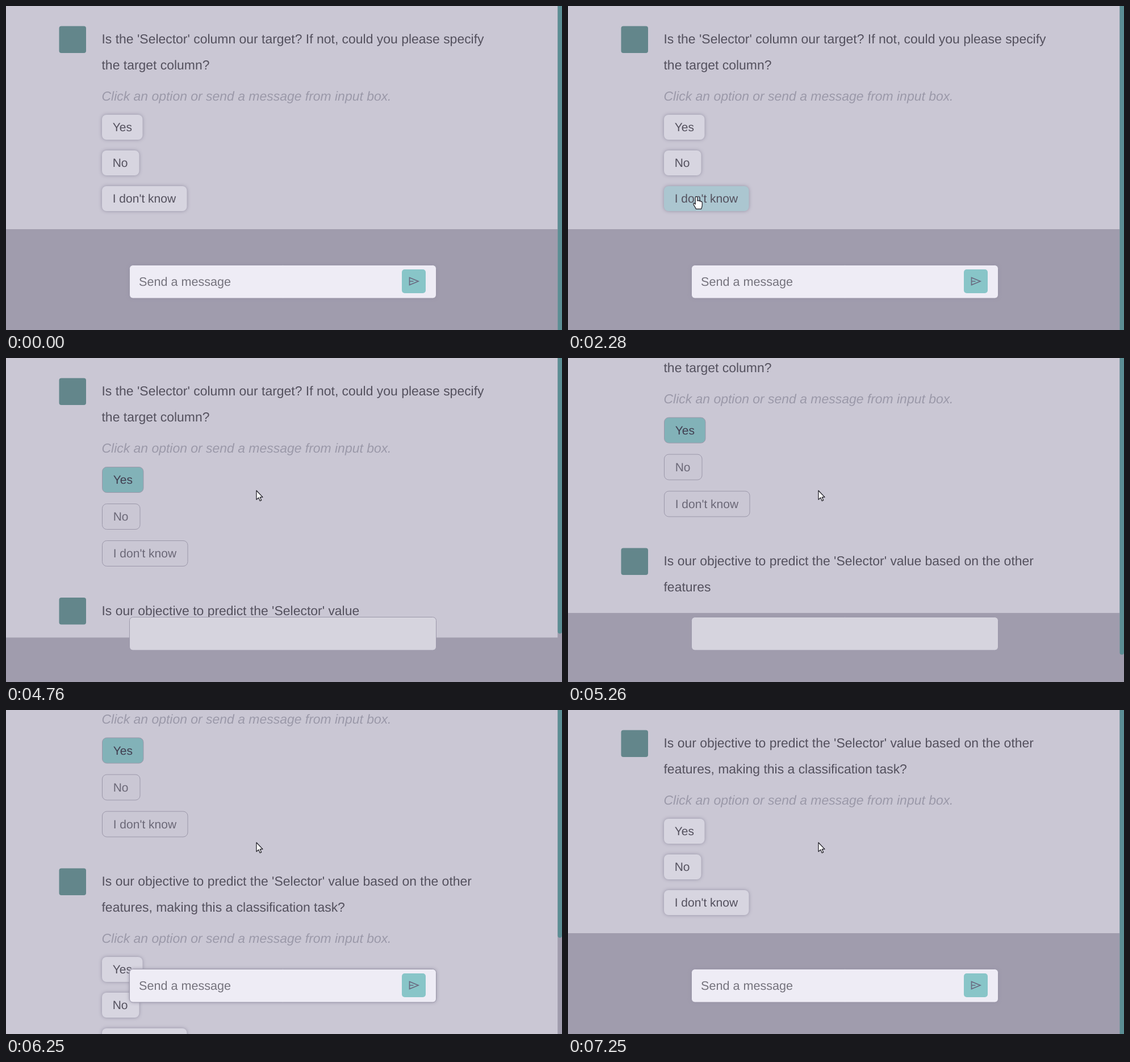
These frames come from a looping animation (979x572 px, 8 s). An HTML page with a canvas:

```html
<!DOCTYPE html>
<html lang="en">
<head>
<meta charset="utf-8">
<title>Chat options</title>
<style>
html, body { margin: 0; width: 100%; height: 100%; overflow: hidden; background: #a09cad; }
canvas { display: block; width: 979px; height: 572px; }
</style>
</head>
<body>
<canvas id="stage"></canvas>
<script>
const W = 979, H = 572, LOOP = 8000;
const PICK = 3680, ASK = 6090, GAP = 387.5;
const BAR = 971.5, BODY = 22.95;
const FONT = '"Liberation Sans", Arial, sans-serif';
const canvas = document.getElementById('stage');
const ctx = canvas.getContext('2d');
const dpr = window.devicePixelRatio || 1;
canvas.width = W * dpr;
canvas.height = H * dpr;

const HINT = 'Click an option or send a message from input box.';
const OPTIONS = [['Yes', 71.5], ['No', 65.5], ["I don't know", 149.5]];
const FIRST = ["Is the 'Selector' column our target? If not, could you please specify",
  'the target column?'];
// streamed reply: [time, token, line]
const TOKENS = [
  [3760, 'Is', 0], [3840, ' our', 0], [4020, ' objective', 0], [4100, ' to', 0],
  [4180, ' predict', 0], [4260, ' the', 0], [4350, " '", 0], [4430, 'Selector', 0],
  [4510, "'", 0], [4600, ' value', 0], [4840, ' based', 0], [4930, ' on', 0],
  [5010, ' the', 0], [5090, ' other', 0], [5180, 'features', 1], [5340, ',', 1],
  [5430, ' making', 1], [5510, ' this', 1], [5680, ' a', 1],
  [5760, ' classification', 1], [5840, ' task', 1], [6010, '?', 1]
];
// pointer path: [time, x, y]
const PATH = [
  [70, 905, 351], [150, 735, 325], [230, 540, 287], [310, 465, 270], [390, 386, 260],
  [480, 330, 247], [560, 270, 238], [640, 228, 232], [810, 215, 222], [890, 221, 222],
  [1350, 221, 222], [1600, 222, 272], [1990, 222, 272], [2210, 226, 336],
  [2900, 226, 336], [3200, 211, 222], [3960, 211, 222], [4500, 441, 234]
];

const clamp = v => Math.max(0, Math.min(1, v));
const ramp = (t, a, b) => clamp((t - a) / (b - a));
const ease = p => (1 - Math.cos(Math.PI * p)) / 2;
const mix = (a, b, p) => 'rgb(' + a.map((v, i) => Math.round(v + (b[i] - v) * p)) + ')';

function pointer(t) {
  const last = PATH[PATH.length - 1];
  if (t >= last[0]) return [last[1], last[2]];
  if (t < PATH[0][0]) return null;
  const i = PATH.findIndex(k => k[0] > t);
  const [t0, x0, y0] = PATH[i - 1], [t1, x1, y1] = PATH[i];
  const p = ramp(t, t0, t1);
  return [x0 + (x1 - x0) * p, y0 + (y1 - y0) * p];
}

function hovered(t) {
  const p = t < PICK && pointer(t);
  if (!p) return -1;
  return OPTIONS.findIndex(([, w], i) => {
    const y = 192 + 63 * i;
    return p[0] >= 169 && p[0] <= 169 + w && p[1] >= y && p[1] <= y + 44;
  });
}

// share of the last 120 ms spent over option i
function glow(t, i) {
  let n = 0;
  for (let k = 0; k < 12; k++) n += hovered(t - k * 10) === i;
  return n / 12;
}

function scrollAt(t) {
  return 143.5 * ease(ramp(t, 4785, 5620)) + 244 * ease(ramp(t, 6780, 7250));
}

function text(str, x, y, size, color, style = '') {
  ctx.font = `${style} ${size}px ${FONT}`;
  ctx.fillStyle = color;
  ctx.fillText(str, x, y);
}

function box(x, y, w, h, r, fill, stroke, glowing) {
  ctx.save();
  ctx.beginPath();
  ctx.roundRect(x, y, w, h, r);
  if (glowing) {
    ctx.shadowColor = '#9591a5';
    ctx.shadowBlur = 6 * dpr;
  }
  if (fill) {
    ctx.fillStyle = fill;
    ctx.fill();
  }
  ctx.shadowColor = 'transparent';
  if (stroke) {
    ctx.strokeStyle = stroke;
    ctx.stroke();
  }
  ctx.restore();
}

function message(top, lines) {
  box(93.5, top, 47.5, 47.5, 4, '#63868b');
  lines.forEach((s, i) => text(s, 168.5, top + 30.6 + 46 * i, BODY, '#54515e'));
}

function options(top, t, picked) {
  text(HINT, 168.5, top + 131.7, BODY, '#9b99a9', 'italic');
  OPTIONS.forEach(([label, w], i) => {
    if (picked) {
      const y = top + 156.5 + 65 * i;
      box(169.5, y + 0.5, w + 1, 45, 8, i ? null : '#82b2b8', '#9c98aa');
      text(label, 188.7, y + 30, 21, i ? '#6b6877' : '#413e50');
    } else {
      const y = top + 156.5 + 63 * i;
      box(169, y, w, 44, 8, mix([215, 213, 224], [171, 198, 208], glow(t, i)), null, true);
      text(label, 187.7, y + 29, 21, '#54515e');
    }
  });
}

function input(t) {
  const on = t < PICK || t >= ASK;
  box(217.5, 457.5, 540, 58.5, 6, on ? '#eeecf5' : '#d6d4de', '#9c98aa', on);
  if (on) text('Send a message', 234, 493.8, 21.6, '#75737d');
  const alpha = t < 5000 ? 1 - ramp(t, 3660, 3860) : ramp(t, 6050, 6230);
  if (!alpha) return;
  ctx.save();
  ctx.globalAlpha = alpha;
  box(697, 465, 42, 42, 5, '#88c5c8');
  ctx.strokeStyle = on ? '#6a6a80' : '#f4f2f8';
  ctx.lineWidth = 1.7;
  ctx.beginPath();
  ctx.moveTo(710.5, 479.5);
  ctx.lineTo(726, 486);
  ctx.lineTo(710.5, 492.5);
  ctx.closePath();
  ctx.moveTo(710.5, 486);
  ctx.lineTo(717.5, 486);
  ctx.stroke();
  ctx.restore();
}

const ARROW = new Path2D('M0 0V16L3.7 12.6L6.2 18.3L8.7 17.2L6.3 11.7H11Z');
const HAND = new Path2D('M-1.8 2Q0 -1.2 1.8 2V8Q4 6.4 5.2 8.5Q7.4 7.3 8.2 9.5' +
  'Q10 8.8 10.3 11V16Q10 19 8.6 22.3H-.6Q-2 19 -4.8 14.8Q-5.8 11.6 -3.5 12L-1.8 14Z');

function cursor(t) {
  const p = pointer(t);
  if (!p) return;
  const shape = hovered(t) >= 0 ? HAND : ARROW;
  ctx.save();
  ctx.translate(p[0], p[1]);
  ctx.lineJoin = 'round';
  ctx.lineWidth = 1.2;
  ctx.fillStyle = '#fff';
  ctx.strokeStyle = '#1d1c24';
  ctx.fill(shape);
  ctx.stroke(shape);
  ctx.restore();
}

function draw(t) {
  ctx.setTransform(dpr, 0, 0, dpr, 0, 0);
  ctx.textRendering = 'geometricPrecision';
  ctx.lineWidth = 1;
  const picked = t >= PICK, asked = t >= ASK;
  const lines = ['', ''];
  for (const [at, word, row] of TOKENS) if (t >= at) lines[row] += word;

  let end = 394;
  if (picked) end = lines[1] ? 537.5 : 493.5;
  if (asked) end = 394 + GAP;
  const scroll = scrollAt(t);

  ctx.fillStyle = '#a09cad';
  ctx.fillRect(0, 0, W, H);
  ctx.fillStyle = '#cac7d4';
  ctx.fillRect(0, 0, BAR, end - scroll);

  const top = 35.5 - scroll;
  message(top, FIRST);
  options(top, t, picked);
  if (picked) message(top + GAP, lines);
  if (asked) options(top + GAP, t, false);

  const left = Math.max(0, end - 394 - scroll);
  const thumb = H - left * (asked ? 0.697 : 0.86);
  ctx.fillStyle = '#a09cad';
  ctx.fillRect(BAR, 0, W - BAR, H);
  box(BAR, -20, W - BAR, thumb + 20, left > 1 ? 4 : 0, '#5b8e94');

  input(t);
  cursor(t);
}

const start = performance.now();
function tick() {
  draw((performance.now() - start) % LOOP);
  requestAnimationFrame(tick);
}
tick();
</script>
</body>
</html>
```
